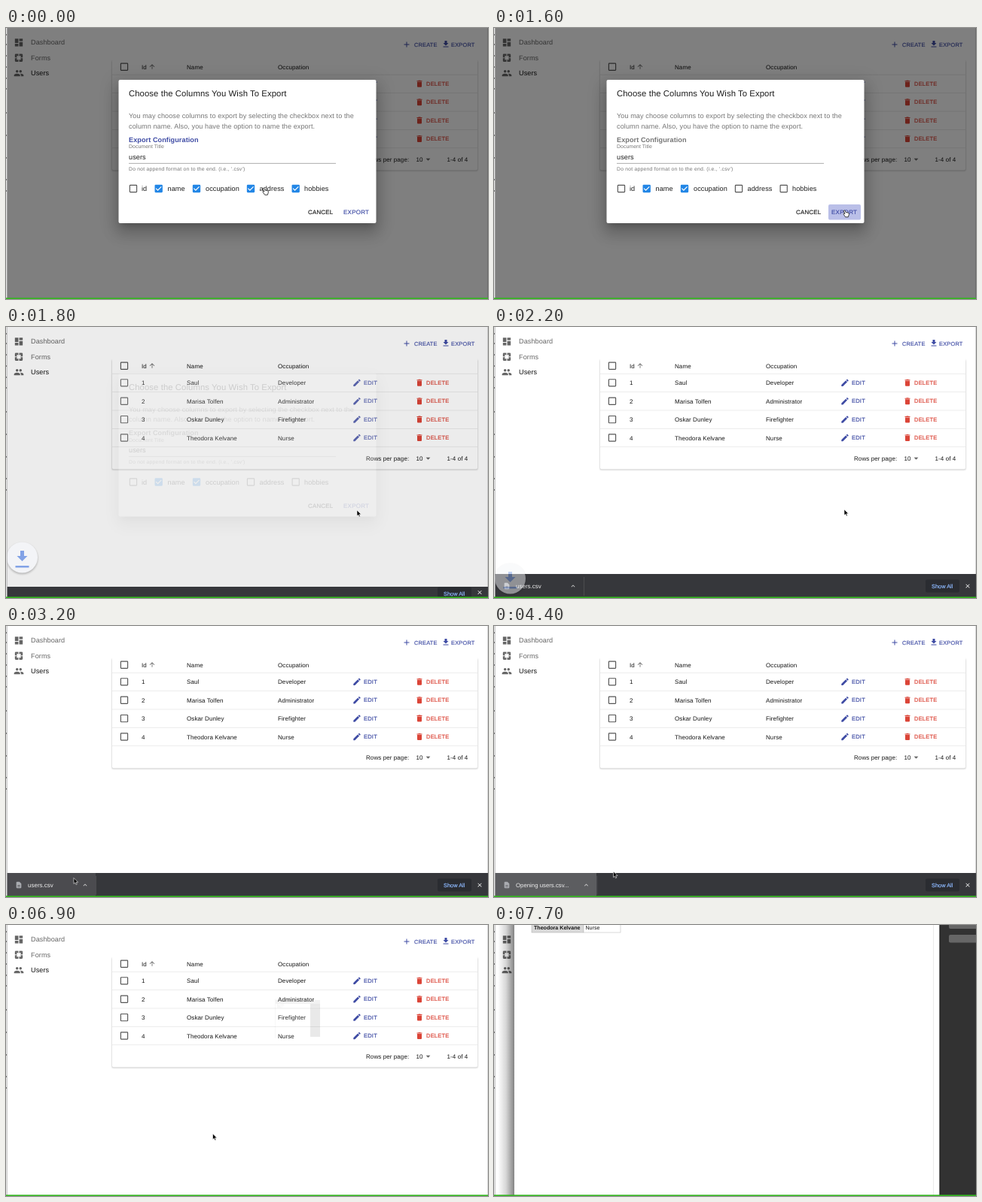
Recreate the animation shown at these times as an HTML page. Size 640x361 px, loop 8000 ms.

```html
<!DOCTYPE html>
<html lang="en">
<head>
<meta charset="utf-8">
<title>Export users</title>
<style>
html, body { margin: 0; width: 100%; height: 100%; overflow: hidden; background: #fff; }
#stage { display: block; width: 100%; height: 100%; font-family: "Liberation Sans", Arial, Helvetica, sans-serif; }
text { white-space: pre; text-rendering: geometricPrecision; }
</style>
</head>
<body>
<svg id="stage" viewBox="0 0 640 361" xmlns="http://www.w3.org/2000/svg"></svg>
<script>
const LOOP = 8000, STEP = 100;
const INK = '#161616', GREY = '#666', INDIGO = '#3e4ba4', RED = '#db4437', BLUE = '#2286e6';

// Icons on a 24 unit grid
const ICONS = {
  dashboard: 'M3 13h8V3H3zm0 8h8v-6H3zm10 0h8V11h-8zm0-18v6h8V3z',
  forms: 'M3 5v6h5L7 7l4 1V3H5q-2 0-2 2zm5 8H3v6q0 2 2 2h6v-5l-4 1zm9 4l-4-1v5h6q2 0 2-2v-6h-5zm2-14h-6v5l4-1-1 4h5V5q0-2-2-2z',
  people: 'M16 11a3 3 0 1 0 0-6 3 3 0 1 0 0 6zm-8 0a3 3 0 1 0 0-6 3 3 0 1 0 0 6zm0 2c-2.3 0-7 1.2-7 3.5V19h14v-2.5c0-2.3-4.7-3.5-7-3.5zm8 0h-1q2 1.4 2 3.5V19h6v-2.5c0-2.3-4.7-3.5-7-3.5z',
  edit: 'M3 17.2V21h3.8L17.8 9.9l-3.7-3.7zM20.7 7a1 1 0 0 0 0-1.4l-2.3-2.3a1 1 0 0 0-1.4 0l-1.8 1.8 3.7 3.7z',
  trash: 'M6 19q0 2 2 2h8q2 0 2-2V7H6zM19 4h-3.5l-1-1h-5l-1 1H5v2h14z',
  download: 'M19 9h-4V3H9v6H5l7 7zM5 18v2h14v-2z',
  add: 'M19 13h-6v6h-2v-6H5v-2h6V5h2v6h6z',
  up: 'M4 12l1.4 1.4L11 7.8V20h2V7.8l5.6 5.6L20 12l-8-8z',
  down: 'M7 10l5 5 5-5z',
  box: 'M19 5v14H5V5zm0-2H5q-2 0-2 2v14q0 2 2 2h14q2 0 2-2V5q0-2-2-2z',
  checked: 'M19 3H5q-2 0-2 2v14q0 2 2 2h14q2 0 2-2V5q0-2-2-2zm-9 14l-5-5 1.4-1.4 3.6 3.6 7.6-7.6L19 8z',
  file: 'M14 2H6q-2 0-2 2v16q0 2 2 2h12q2 0 2-2V8zM8 12h8v2H8zm0 4h8v2H8z',
  chevron: 'M6 15.4L7.4 16.8 12 12.2l4.6 4.6 1.4-1.4-6-6z',
  close: 'M19 6.4L17.6 5 12 10.6 6.4 5 5 6.4 10.6 12 5 17.6 6.4 19 12 13.4l5.6 5.6 1.4-1.4-5.6-5.6z'
};

const icon = (name, cx, cy, fill, size = 13.8, attrs = '') =>
  `<path d="${ICONS[name]}" fill="${fill}" ${attrs} transform="translate(${cx - size / 2} ${cy - size / 2}) scale(${size / 24})"/>`;
const text = (x, y, s, size, fill = INK, spacing = 0.0094, attrs = '') =>
  `<text x="${x}" y="${y}" font-size="${size}" fill="${fill}" letter-spacing="${spacing * size}" ${attrs}>${s}</text>`;
const rect = (x, y, w, h, fill, attrs = '') =>
  `<rect x="${x}" y="${y}" width="${w}" height="${h}" fill="${fill}" ${attrs}/>`;
const cell = (x, y, s) => text(x, y, s, 8, INK, 0.0107);
const button = (x, y, s, fill, size = 7.5) => text(x, y, s, size, fill, 0.03, `stroke="${fill}" stroke-width=".15"`);
const blurred = (x, y, w, h, alpha, sigma) =>
  rect(x, y, w, h, '#000', `opacity="${alpha}" style="filter:blur(${sigma}px)"`);

const users = [
  ['Saul', 'Developer'],
  ['Marisa Tolfen', 'Administrator'],
  ['Oskar Dunley', 'Firefighter'],
  ['Theodora Kelvane', 'Nurse']
];

function page() {
  const nav = [['dashboard', 'Dashboard', GREY], ['forms', 'Forms', GREY], ['people', 'Users', '#111']];
  const menu = nav.map(([name, label, fill], i) =>
    icon(name, 17, 19.3 + i * 20.4, GREY) + text(33, 22.4 + i * 20.4, label, 9.1, fill)).join('');
  const rows = users.map(([name, job], i) => {
    const y = 74.3 + i * 24.4;
    return icon('box', 157, y, '#555') + cell(180, y + 3, i + 1) + cell(240, y + 3, name) + cell(361, y + 3, job) +
      icon('edit', 466, y, INDIGO, 12.5) + button(475, y + 2.6, 'EDIT', INDIGO) +
      icon('trash', 549, y, RED, 12) + button(558, y + 2.6, 'DELETE', RED) +
      rect(141, y + 12, 485, 0.6, '#e0e0e0');
  }).join('');
  return rect(0, 0, 640, 361, '#fff') + menu +
    icon('add', 532, 22, INDIGO, 12) + button(542, 24.7, 'CREATE', INDIGO, 7.4) +
    icon('download', 584, 21.6, INDIGO, 12) + button(591, 24.7, 'EXPORT', INDIGO, 7.4) +
    blurred(141, 44, 485, 146, 0.3, 0.8) + rect(141, 41.5, 485, 148, '#fff', 'rx="2"') +
    icon('box', 157, 51.7, '#555') + cell(180, 55, 'Id') + icon('up', 194, 51.5, '#666', 10) +
    cell(240, 55, 'Name') + cell(361, 55, 'Occupation') + rect(141, 61.9, 485, 0.6, '#e0e0e0') + rows +
    cell(478, 178, 'Rows per page:') + cell(544.5, 178, '10') + icon('down', 560.5, 175, GREY, 13.8) +
    cell(585.5, 178, '1-4 of 4');
}

const fields = [['id', 169, 180], ['name', 202.7, 214.5], ['occupation', 253, 265], ['address', 325, 336.5], ['hobbies', 384.7, 396]];

function dialog() {
  return blurred(147, 81, 347, 195, 0.14, 10) + blurred(144, 69, 353, 201, 0.12, 11) + blurred(153, 79, 335, 183, 0.2, 4) +
    rect(149.5, 69, 342, 191, '#fff', 'rx="2"') +
    text(163, 91, 'Choose the Columns You Wish To Export', 11.3, '#1c1c1c', 0.0075) +
    text(163, 120, 'You may choose columns to export by selecting the checkbox next to the', 9.1, '#757575') +
    text(163, 133.5, 'column name. Also, you have the option to name the export.', 9.1, '#757575') +
    text(163, 151.6, 'Export Configuration', 9.1, INDIGO, 0.0094, 'id="legend" font-weight="bold"') +
    text(163, 160.2, 'Document Title', 6.9, '#757575') + text(163, 174.5, 'users', 9.1, '#1c1c1c') +
    rect(163, 179.9, 275, 0.7, '#8a8a8a') +
    text(163, 189.6, "Do not append format on to the end. (i.e., '.csv')", 6.8, '#757575', 0.0333) +
    fields.map(([label, x, tx]) =>
      `<g id="off-${label}">${icon('box', x, 214, '#555')}</g><g id="on-${label}">${icon('checked', x, 214, BLUE)}</g>` +
      text(tx, 217, label, 9.1, '#1c1c1c')).join('') +
    rect(444, 235, 43, 20.5, '#5c66c8', 'id="press" rx="2"') +
    button(401, 248.1, 'CANCEL', '#1c1c1c', 7.9) + button(448, 248.1, 'EXPORT', INDIGO, 8);
}

function shelf() {
  return rect(1, 0, 639, 40, '#36373b') + '<g id="shelf-row">' +
    rect(1, -16, 135, 32, '#fff', 'id="item-bg"') +
    `<g id="item">${icon('file', 17, 0, '#a9abb0', 10)}` + text(29, 2.8, 'users.csv', 8, '#eee', 0, 'id="item-label"') + '</g>' +
    `<g id="item-end">${icon('chevron', -14, -0.5, '#ddd', 10)}${rect(0, -12, 0.7, 25, '#55565a', 'id="divider"')}</g>` +
    icon('close', 629, 0, '#eee', 9) + '</g><g id="show-all">' +
    rect(573, -8.5, 45, 17, '#2a2c31', 'rx="2"') +
    text(581, 2.8, 'Show All', 7.4, '#8ab4f8', 0, 'stroke="#8ab4f8" stroke-width=".2"') + '</g>';
}

// Spreadsheet window in its own coordinates, 723 by 600
function sheet() {
  const rows = [['name', 'occupation'], ...users].map(([a, b], i) => {
    const y = 68 + i * 12.4;
    return rect(23, y, 69, 12.4, i ? '#d9d9d9' : '#c4c4c4', 'stroke="#b5b5b5" stroke-width=".6"') +
      rect(92, y, 49, 12.4, i ? '#fff' : '#c4c4c4', 'stroke="#c0c0c0" stroke-width=".6"') +
      text(26, y + 8.3, a, 7.1, '#111', 0, 'font-weight="bold"') + text(94.5, y + 8.3, b, 7.1, '#111', 0);
  }).join('');
  return rect(-22, -20, 22, 640, 'url(#edge)') + rect(0, 0, 723, 600, '#fff') + rect(0, 0, 723, 60, '#8b8b8b') + rows +
    rect(556, 60, 0.7, 540, '#e2e2e2') + rect(564.6, 60, 159, 540, '#323232') + rect(564.6, 60, 0.8, 540, '#161616') +
    rect(577, 114, 130, 11, '#666', 'rx="2"') + rect(577, 133, 130, 10.5, '#666', 'rx="2"');
}

const specks = [8, 21, 36, 51, 66, 80, 112, 142, 172, 201, 216].map(y => rect(0, y, 1, 2, '#777')).join('');

document.getElementById('stage').innerHTML =
  `<defs><linearGradient id="edge"><stop offset="0" stop-opacity="0"/><stop offset=".5" stop-opacity=".16"/><stop offset="1" stop-opacity=".48"/></linearGradient></defs>
  ${page()}
  ${rect(639.2, 0, 0.8, 361, '#ccc')}
  ${rect(0, 0, 640, 361, '#000', 'id="backdrop"')}
  <g id="dialog">${dialog()}</g>
  <svg id="shelf" width="640">${shelf()}</svg>
  <g id="badge"><circle cx="21.5" cy="1.5" r="20.5" opacity=".28" style="filter:blur(1.5px)"/><circle cx="21.5" r="20.5" fill="#f4f5f8"/>
    <path d="M19-9h5v7h4.500L21.500 5 14.500-2H19zM12.500 11h18v2.400h-18z" fill="#7d9fe6"/></g>
  <g id="sheet">${sheet()}</g>
  ${rect(0, 0, 1, 361, '#e4e4e4')}${specks}${rect(1, 0, 0.7, 361, '#b4b4b4')}
  <path id="arrow" d="M0 0V7.800L1.800 6.200 3 8.900 4.300 8.300 3.100 5.700H5.600Z" fill="#000" stroke="#fff" stroke-width=".6"/>
  <path id="hand" d="M1.400.3C.5.200.1.900.5 1.700L2 5 .9 4.500C-.3 4.300-.4 5.100.3 5.800L2.600 9.300H6.300L7.300 6.200C7.600 3.600 6.200 3.300 3.300 3.200L2 .7Z" fill="#fff" stroke="#111" stroke-width=".8" stroke-linejoin="round"/>
  ${rect(0, 359.4, 640, 1.6, '#32b51e')}`;

const el = id => document.getElementById(id);
const set = (id, attrs) => { for (const k in attrs) el(id).setAttribute(k, attrs[k]); };
const show = (id, on) => set(id, { visibility: on ? 'visible' : 'hidden' });
const clamp = v => Math.max(0, Math.min(1, v));
const ease = v => v * v * (3 - 2 * v);

// keys: [time, ...values]
function track(keys, t, curve = v => v) {
  let i = 0;
  while (i < keys.length - 2 && t >= keys[i + 1][0]) i++;
  const a = keys[i], b = keys[i + 1], k = curve(clamp((t - a[0]) / (b[0] - a[0])));
  return a.slice(1).map((v, j) => v + (b[j + 1] - v) * k);
}

const pointer = [
  [0, 341, 213], [100, 341, 213], [500, 387, 213], [600, 387, 213], [1100, 464, 242.5], [1700, 464, 242.5],
  [1800, 466, 244], [2200, 465, 243], [2700, 465, 243], [3300, 60, 343], [4100, 60, 343], [4400, 158.5, 327],
  [5100, 274.5, 278], [7300, 274.5, 278], [7400, 297, 220], [7600, 192, 55]
];
const fade = [[1600, 1], [1700, 0.7], [1800, 0.15], [1900, 0]];
const shelfHeight = [[1700, 0], [1800, 15], [1900, 28], [2000, 32], [4700, 32], [5100, 0]];
const zoom = [[6900, 0], [7000, 0.65], [7100, 1]];

function render(t) {
  const [alpha] = track(fade, t), [height] = track(shelfHeight, t);
  const [px, py] = track(pointer, t, ease);

  set('backdrop', { opacity: alpha / 2 });
  set('dialog', { opacity: alpha, transform: `translate(0 ${-height / 2})` });
  set('legend', { fill: t < 1500 ? INDIGO : '#757575' });
  const on = { id: false, name: true, occupation: true, address: t < 100, hobbies: t < 500 };
  for (const [label] of fields) {
    show('on-' + label, on[label]);
    show('off-' + label, !on[label]);
  }
  set('press', { opacity: t < 1000 || t >= 1800 ? 0 : t < 1500 ? 0.08 : t < 1600 ? 0.25 : 0.42 });

  const opening = t >= 4000, over = t >= 2800 && px < 119 && py > 329;
  show('shelf', height > 0);
  set('shelf', { y: 361 - height, height });
  set('shelf-row', { transform: `translate(0 ${height / 2})` });
  set('show-all', { transform: `translate(0 ${Math.max(height / 2, 9)})` });
  set('item', { opacity: clamp((t - 1800) / 250) });
  set('item-bg', { width: opening ? 135 : 118, opacity: opening ? 0.19 : over ? 0.1 : 0 });
  set('item-label', { 'font-size': opening ? 7.8 : 8 });
  el('item-label').textContent = opening ? 'Opening users.csv...' : 'users.csv';
  set('item-end', { transform: `translate(${opening ? 136.5 : 119} 0)`, opacity: clamp((t - 1800) / 300) });

  show('badge', t >= 1800 && t < 2600);
  set('badge', { transform: `translate(0 ${307 + (t - 1800) * 0.07})`, opacity: clamp(0.95 * (1 - (t - 1800) / 800)) });

  const [k] = track(zoom, t), small = 0.0816;
  show('sheet', t >= 6900);
  set('sheet', {
    transform: `translate(${358 - 331 * k} ${100 - 220 * k}) scale(${small + (1 - small) * k})`,
    opacity: 0.1 + 0.9 * k
  });

  const hand = t <= 600 || (t >= 1000 && t < 1800);
  show('hand', hand);
  show('arrow', !hand && t < 7700);
  for (const id of ['hand', 'arrow']) set(id, { transform: `translate(${px} ${py})` });
}

const start = performance.now();
function tick() {
  const t = (performance.now() - start) % LOOP;
  render(Math.floor(t / STEP) * STEP);
  requestAnimationFrame(tick);
}
tick();
</script>
</body>
</html>
```
